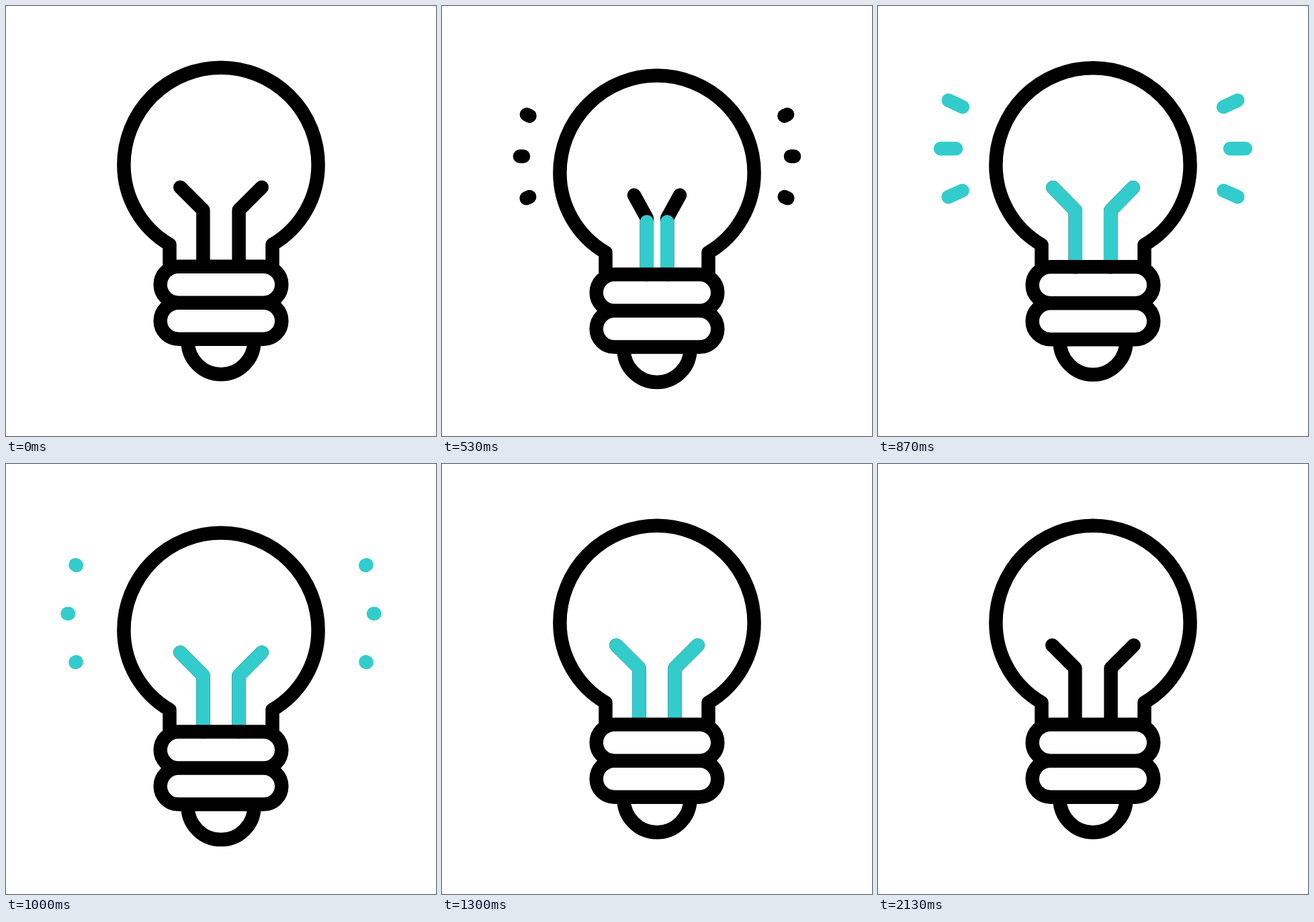
These frames come from a looping animation (640x640 px, 2.5 s). An HTML page with a canvas:

```html
<!DOCTYPE html>
<html lang="en">
<head>
<meta charset="utf-8">
<title>Light bulb</title>
<style>
  html, body { margin: 0; width: 100%; height: 100%; overflow: hidden; background: #fff; }
  canvas { display: block; }
</style>
</head>
<body>
<canvas id="stage" width="640" height="640"></canvas>
<script>
const ctx = document.getElementById('stage').getContext('2d');
const LOOP = 2500, FPS = 30;
const BLACK = '#000', TEAL = '#33cccc';

const bulb = new Path2D(`
  M243.5 387.7 V355 A137.3 137.3 0 0 1 175.4 236.3
  A144.6 144.6 0 0 1 464.6 236.3 A137.3 137.3 0 0 1 396.5 355 V387.7
  M270.6 496 V498.8 A49.4 49.4 0 0 0 369.4 498.8 V496`);
for (const y of [387.7, 441.7]) bulb.roundRect(229.7, y, 180.6, 54, 27);

// Left rays as inner x, y, outer x, y; the right ones are mirrored.
const rays = [
  [130.5, 151.8, 103.5, 139.3],
  [121, 211.8, 91.5, 211.8],
  [130.2, 272.2, 103.3, 284.2]
];

const lerp = (a, b, p) => a + (b - a) * p;

// Eased progress from 0 to 1 between two times.
function ease(t, start, end) {
  const p = Math.min(1, Math.max(0, (t - start) / (end - start)));
  return p * p * (3 - 2 * p);
}

function polyline(points, color) {
  ctx.strokeStyle = color;
  ctx.beginPath();
  for (const [x, y] of points) ctx.lineTo(x, y);
  ctx.stroke();
}

function drawRay([x1, y1, x2, y2], from, to, color) {
  if (to - from < 0.001) return;
  polyline([from, to].map(p => [lerp(x1, x2, p), lerp(y1, y2, p)]), color);
}

function drawFilament(squeeze, fill) {
  const topX = 259.3 + 38.8 * squeeze, kneeX = 293.4 + 16.6 * squeeze;
  const points = [[kneeX, 387.7], [kneeX, 303.8], [topX, 269.7]];
  polyline(points, BLACK);
  if (fill < 0.001) return;
  const length = 83.9 + Math.hypot(kneeX - topX, 34.1);
  if (fill < 1) ctx.setLineDash([length * fill, 999]);
  polyline(points, TEAL);
  ctx.setLineDash([]);
}

function draw(t) {
  const drop = 23 * (ease(t, 412, 650) - ease(t, 650, 888)
                   + ease(t, 888, 1120) - ease(t, 1120, 1300));
  const squeeze = ease(t, 320, 660) - ease(t, 660, 888);
  const fill = ease(t, 320, 680) - ease(t, 1740, 2130);
  const blackEnd = ease(t, 475, 697);
  const tealEnd = ease(t, 675, 897);
  const tealStart = ease(t, 809, 1030);

  ctx.setTransform(1, 0, 0, 1, 0, 0);
  ctx.clearRect(0, 0, 640, 640);
  ctx.lineWidth = 20.5;
  ctx.lineCap = ctx.lineJoin = 'round';

  for (const side of [1, -1]) {
    ctx.setTransform(side, 0, 0, 1, side > 0 ? 0 : 640, drop);
    drawFilament(squeeze, fill);
    for (const ray of rays) {
      if (t < 850) drawRay(ray, 0, blackEnd, BLACK);
      drawRay(ray, tealStart, tealEnd, TEAL);
    }
  }
  ctx.strokeStyle = BLACK;
  ctx.stroke(bulb);
}

function tick() {
  const t = performance.now() % LOOP;
  draw(Math.floor(t * FPS / 1000 + 0.11) * 1000 / FPS);
  requestAnimationFrame(tick);
}
tick();
</script>
</body>
</html>
```
